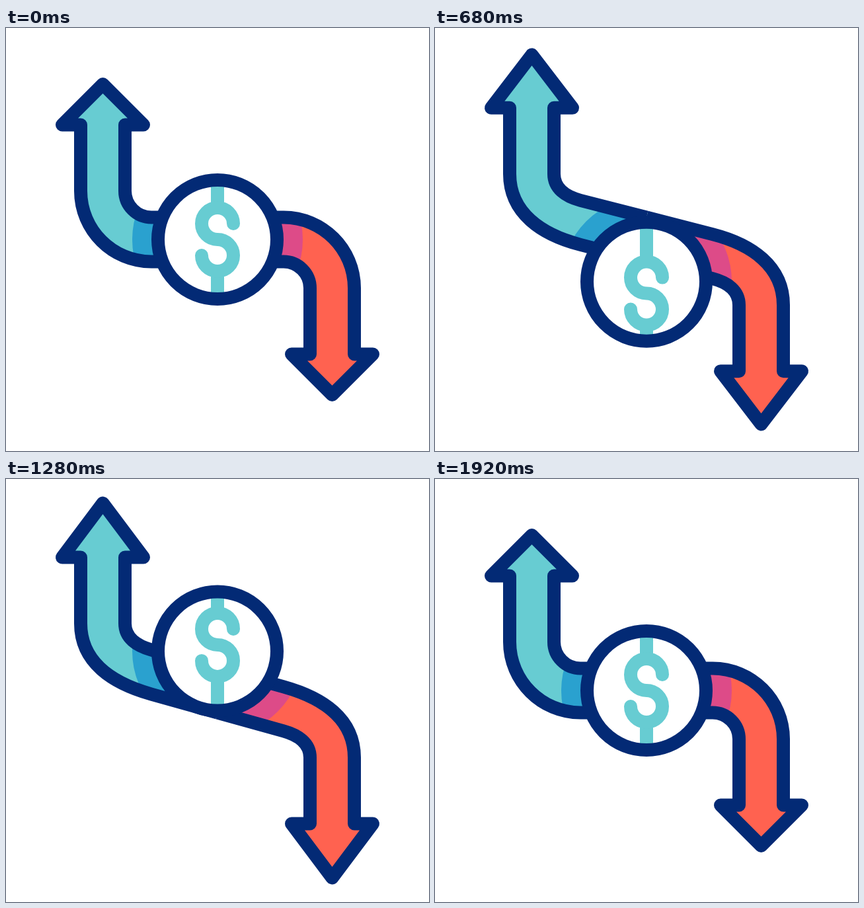
An HTML page with a canvas for the animation above (2000 ms loop, 640 by 640 pixels).

```html
<!DOCTYPE html>
<html lang="en">
<head>
<meta charset="utf-8">
<title>Rising and falling money</title>
<style>
  html, body { margin: 0; width: 100%; height: 100%; overflow: hidden; background: #fff; }
  canvas { display: block; width: 100vmin; height: 100vmin; }
</style>
</head>
<body>
<canvas id="stage" width="640" height="640"></canvas>
<script>
const ctx = document.getElementById('stage').getContext('2d');
const LOOP = 2000, STEP = 40;
const NAVY = '#032a75', TEAL = '#67ccd2', BLUE = '#2aa1cf', RED = '#ff6250', PINK = '#dd4b88';

// Smooth curve through [time, value] keys, without overshoot
function track(keys) {
  const secant = i => (keys[i + 1][1] - keys[i][1]) / (keys[i + 1][0] - keys[i][0]);
  const slopes = keys.map((_, i) => {
    if (i === 0 || i === keys.length - 1) return 0;
    const a = secant(i - 1), b = secant(i);
    return a * b > 0 ? 2 * a * b / (a + b) : 0;
  });
  return t => {
    if (t <= keys[0][0]) return keys[0][1];
    const i = keys.findIndex(k => k[0] > t) - 1;
    if (i < 0) return keys[keys.length - 1][1];
    const [t0, v0] = keys[i], [t1, v1] = keys[i + 1];
    const span = t1 - t0, u = (t - t0) / span, w = 1 - u;
    return w * w * (1 + 2 * u) * v0 + u * u * (3 - 2 * u) * v1
      + span * u * w * (w * slopes[i] - u * slopes[i + 1]);
  };
}

const stretch = track([[60, 0], [320, 8], [520, 27.5], [840, 59], [1000, 67],
  [1120, 63], [1440, 30], [1640, 11], [1920, 0]]);
const coinShift = track([[60, 0], [320, 6], [520, 31], [692, 64], [840, 48],
  [1120, -28], [1344, -64], [1440, -59], [1640, -26], [1920, 0]]);
const signLead = track([[60, 0], [320, 2], [520, 10], [692, 18], [840, 15],
  [1120, -2], [1390, -12], [1640, -5], [1920, 0]]);

// Upper-left arrow, from the middle of the ribbon and back
function arrowPath(d) {
  const h = d * 0.577, tilt = h / 100;
  const p = new Path2D();
  p.moveTo(320, 286.5);
  p.lineTo(220, 286.5 - h);
  p.bezierCurveTo(198, 286.5 - h - 22 * tilt, 180, 268.5 - h, 180, 246.5 - h);
  p.lineTo(180, 146.5 - h);
  p.lineTo(208, 146.5 - h);
  p.lineTo(146.5, 85 - d);
  p.lineTo(85, 146.5 - h);
  p.lineTo(113, 146.5 - h);
  p.lineTo(113, 246.5 - h);
  p.bezierCurveTo(113, 305.5 - h, 161, 353.5 - h - 59 * tilt, 220, 353.5 - h);
  p.lineTo(320, 353.5);
  return p;
}

function disc(y, r) {
  ctx.beginPath();
  ctx.arc(320, y, r, 0, 2 * Math.PI);
}

function drawArrow(path, coinY, color, shade) {
  ctx.fillStyle = color;
  ctx.fill(path);
  ctx.save();
  ctx.clip(path);
  disc(coinY, 129);
  ctx.fillStyle = shade;
  ctx.fill();
  ctx.restore();
  ctx.strokeStyle = NAVY;
  ctx.lineCap = 'butt';
  ctx.stroke(path);
}

function drawCoin(y, signY) {
  disc(y, 90);
  ctx.fillStyle = '#fff';
  ctx.fill();

  ctx.strokeStyle = TEAL;
  ctx.lineCap = 'butt';
  ctx.beginPath();
  ctx.moveTo(320, y - 85);
  ctx.lineTo(320, signY - 46);
  ctx.moveTo(320, signY + 46);
  ctx.lineTo(320, y + 85);
  ctx.stroke();

  ctx.lineCap = 'round';
  ctx.beginPath();
  ctx.arc(320, signY - 24, 24, 0, Math.PI / 2, true);
  ctx.arc(320, signY + 24, 24, -Math.PI / 2, Math.PI);
  ctx.stroke();

  disc(y, 90);
  ctx.strokeStyle = NAVY;
  ctx.stroke();
}

function draw(t) {
  const arrow = arrowPath(stretch(t));
  const y = 320 + coinShift(t);
  ctx.fillStyle = '#fff';
  ctx.fillRect(0, 0, 640, 640);
  ctx.lineWidth = 20;
  ctx.lineJoin = 'round';
  drawArrow(arrow, y, TEAL, BLUE);
  ctx.save();
  ctx.translate(640, 640);
  ctx.scale(-1, -1);
  drawArrow(arrow, 640 - y, RED, PINK);
  ctx.restore();
  drawCoin(y, y + signLead(t));
}

const start = performance.now();
function tick() {
  const t = (performance.now() - start) % LOOP;
  draw(Math.floor(t / STEP) * STEP);
  requestAnimationFrame(tick);
}
tick();
</script>
</body>
</html>
```
